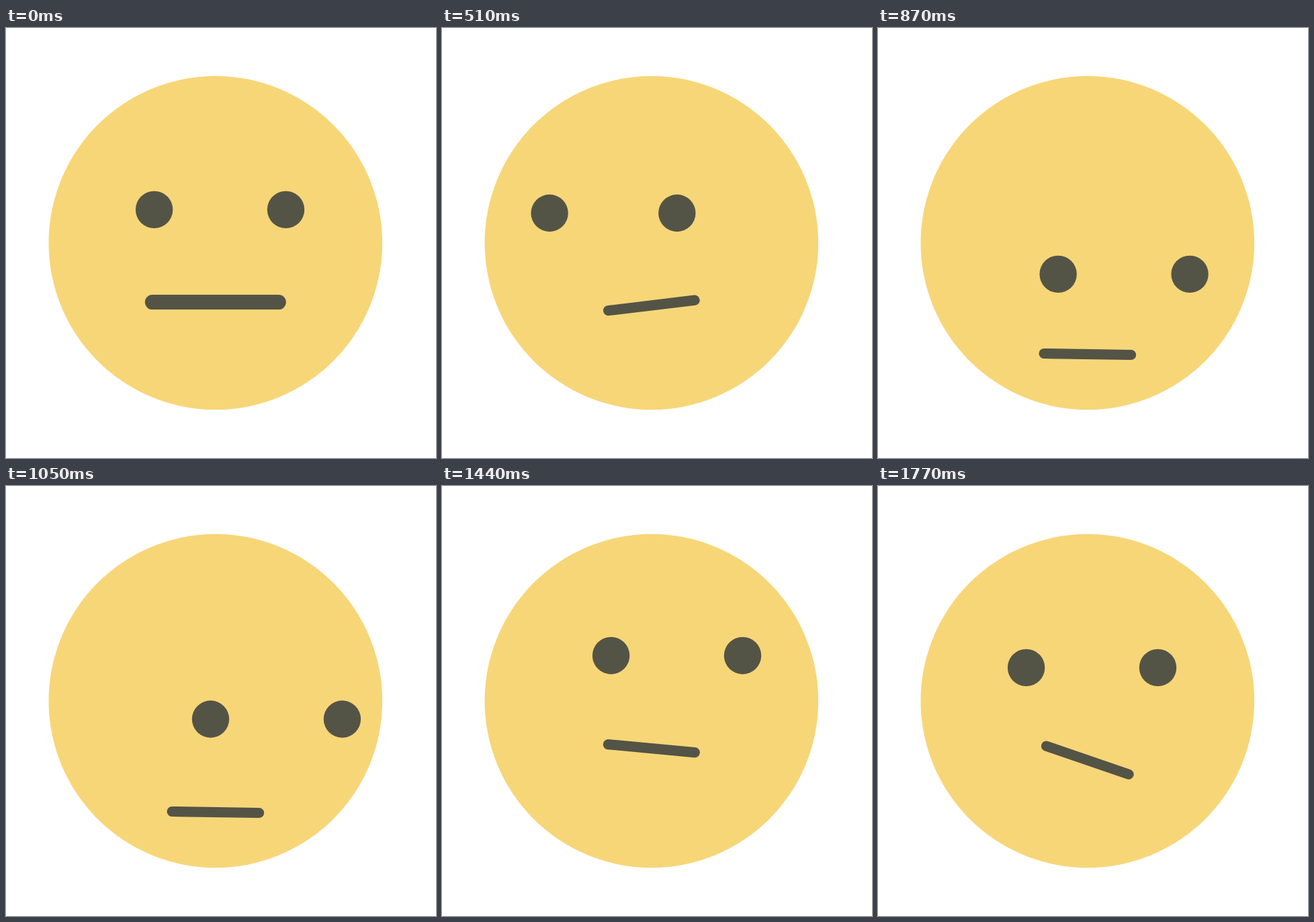
These frames come from a looping animation (640 px wide and 640 px high, 1830 ms). An HTML page:

```html
<!DOCTYPE html>
<html lang="en">
<head>
<meta charset="utf-8">
<title>Pondering face</title>
<style>
  html, body { margin: 0; width: 100%; height: 100%; overflow: hidden; background: #fff; }
  svg { display: block; width: 100%; height: 100%; }
</style>
</head>
<body>
<svg viewBox="0 0 640 640">
  <circle cx="311.8" cy="319.9" r="248.3" fill="#f7d678"/>
  <g fill="#545446">
    <circle id="left" r="27.7"/>
    <circle id="right" r="27.7"/>
    <rect id="mouth" x="-105" y="-11" width="210" height="22" rx="11"/>
  </g>
</svg>
<script>
const LOOP = 1830, STEP = 30, LAST = 1770, BEAT = 150;
const EYE_GAP = 195.9, REST = [220.6, 270.4];

// Where the left eye looks on each beat: quick glances, each followed by a slow drift.
const gaze = [
  REST, [199.3, 226.7],
  [166, 203.7], [163.8, 221.5],   // up left
  [164, 356.5], [176.8, 367.8],   // down left
  [291, 366], [304.5, 347],       // down right
  [303, 217.7], [298, 225.5],     // up right
  REST
];

const el = id => document.getElementById(id);
const left = el("left"), right = el("right"), mouth = el("mouth");

function place(eye, x, y) {
  eye.setAttribute("cx", x);
  eye.setAttribute("cy", y);
}

function draw(ms) {
  const t = Math.min(LAST, Math.floor((ms % LOOP) / STEP + 1e-6) * STEP);
  const beat = t / BEAT;
  const ramp = (from, to) => Math.min(1, Math.max(0, (beat - from) / (to - from)));
  const arc = (from, to) => Math.sin(Math.PI * ramp(from, to));

  const i = Math.min(gaze.length - 2, Math.floor(beat));
  const [x, y] = gaze[i].map((v, n) => v + (gaze[i + 1][n] - v) * ramp(i, i + 1));
  // Vertical glances bow outwards, the right eye more so on the way down.
  const eyeX = x + 4 * (arc(7, 8) - arc(3, 4));
  place(left, eyeX, y);
  place(right, eyeX + EYE_GAP - 6.5 * arc(3, 4), y);

  const lookUp = ramp(0, 2), drop = ramp(3, 4), rise = ramp(7, 8), settle = ramp(9, 10);
  const mouthY = 408.1 - 43.7 * (lookUp - settle) + 121.1 * (drop - rise);
  const angle = -12 * lookUp + 12.9 * drop + 11.1 * (rise - settle) + 18 * ramp(11, LAST / BEAT);
  const size = 1 - 0.311 * lookUp;
  mouth.setAttribute("transform",
    `translate(311.8 ${mouthY}) rotate(${angle}) scale(${size})`);
}

const start = performance.now();
function tick() {
  draw(Math.max(0, performance.now() - start));
  requestAnimationFrame(tick);
}
tick();
</script>
</body>
</html>
```
